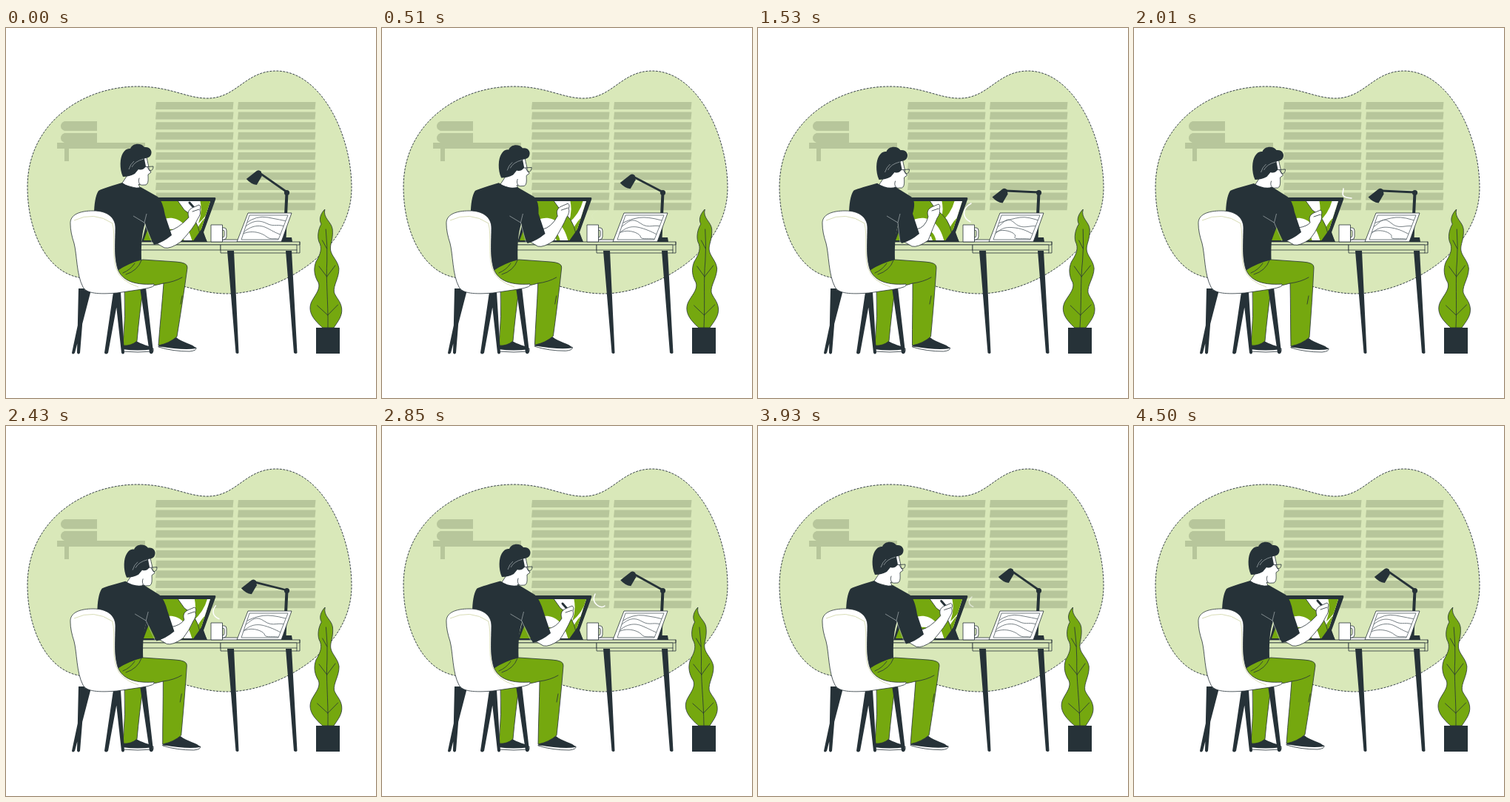
An HTML page for the animation above (4.56 s loop, 500x500 px).

```html
<!DOCTYPE html>
<html lang="en">
<head>
<meta charset="utf-8">
<title>At the desk</title>
<style>
  html, body { margin: 0; width: 100%; height: 100%; overflow: hidden; background: #fff; }
  svg { display: block; width: 100%; height: 100%; }
  .dark { fill: #263238; }
  .green { fill: #75a80f; }
  .shade { fill: #b7c69b; }
  .white { fill: #fff; }
  .wall { fill: #d9e8b9; }
  .edge { stroke: #263238; stroke-width: .8; stroke-linejoin: round; }
  .line { fill: none; stroke: #263238; stroke-width: .8; stroke-linecap: round; }
  .bar { fill: none; stroke: #263238; stroke-linecap: round; }
  .soft { fill: none; stroke: #667075; stroke-width: .9; }
  .pale { fill: none; stroke: #aab2b5; stroke-width: .7; }
</style>
</head>
<body>
<svg viewBox="0 0 500 500">
  <defs>
    <clipPath id="screen"><path d="M206 234H276L259 287H186Z"/></clipPath>
    <clipPath id="sheet"><path d="M329 253H381L368 286H318Z"/></clipPath>
  </defs>

  <path class="wall" stroke="#263238" stroke-width=".9" stroke-dasharray="3 1.500" d="M29 215C29 128 104 79 178 79C222 79 244 95 272 95C312 95 323 58 365 58C425 58 467 143 467 216C467 305 365 359 299 359C254 359 228 339 170 338C140 337 124 342 98 337C52 328 29 270 29 215Z"/>
  <g class="shade">
    <path d="M69 155H188V163H85V180H79V163H69Z"/>
    <path d="M79 126H123V139H79Q74 137 74 132.500Q74 128 79 126Z"/>
    <path d="M79 142H123V155H79Q74 153 74 148.500Q74 144 79 142Z"/>
    <g id="blinds"></g>
  </g>

  <g id="plant">
    <path class="green edge" d="M433 245C428 250 424 258 428 265C424 271 421 284 426 292C429 301 424 309 420 316C416 326 418 336 423 344C426 352 419 360 415 367C408 378 412 388 419 396Q424 402 428 405H443C449 396 455 389 454 379C453 369 446 364 444 357C443 347 451 338 451 325C450 315 441 308 440 300C439 292 444 286 443 272C442 262 430 257 433 245Z"/>
    <path class="line" d="M435 405C436 370 433 340 435 315Q436 295 434 272M435 388L421 375M435 388L449 374M434.500 336L424 322M434.500 336L446 321M435 298L429 287"/>
  </g>
  <path class="dark" d="M419 405H451V440H419Z"/>

  <path class="bar" stroke-width="4" stroke-linecap="butt" d="M379.500 222L376.500 285"/>
  <path class="dark" d="M371 283H386L387 289H370Z"/>
  <path id="lampArm" class="bar" stroke-width="2.800"/>
  <circle class="dark" cx="379.500" cy="222.500" r="3.600"/>
  <g id="lampHead" class="dark">
    <path d="M-3 -2Q0 -4 3 -1L4 5L-3 17Q-11 16 -17 9Z"/>
  </g>

  <path class="white edge" d="M292 286H316L371 287V290H292Z"/>
  <path class="white edge" d="M327 250H386L372 289H312Z"/>
  <path class="soft" d="M329 253H381L368 286H318Z"/>
  <g clip-path="url(#sheet)"><path id="sketch" class="soft"/></g>

  <path class="dark" d="M199 229H282Q284 229 283 232L267 276L272 290H183Z"/>
  <g clip-path="url(#screen)">
    <path class="green" d="M180 230H280V290H180Z"/>
    <path class="white" d="M231 232H278L262 278Q258 256 241 246Z"/>
    <path id="stripe" class="green"/>
    <path class="white" d="M204 263C222 250 245 257 252 290H241C239 271 224 266 198 279Z"/>
    <path class="white" d="M206 290Q219 270 234 282L237 290Z"/>
    <path class="line" d="M231 232L241 246Q258 256 262 278"/>
  </g>
  <path class="dark" d="M264 272L272 289H252Z"/>

  <path class="wall edge" d="M170 289H397V293H170Z"/>
  <path class="wall edge" d="M170 293H290V300H170Z"/>
  <path class="wall edge" d="M290 293H393V304H290Z"/>
  <path class="line" d="M290 300H393M397 289V304H393"/>
  <path class="dark" d="M299 301H308L314.500 439Q313 441 310.500 439ZM378 301H386L393.500 439Q392 441 389 439Z"/>
  <path id="steam" fill="none" stroke="#fff" stroke-width="1.500" stroke-linecap="round"/>
  <path class="white edge" fill-rule="evenodd" d="M292 270H295Q298 270 298 274V282Q298 286 294 286H292ZM292 273V283H293Q295 283 295 280V275Q295 273 293 273Z"/>
  <path class="white edge" d="M277 266H292.500V289H277Z"/>

  <path class="white edge" d="M157 433H199V437Q178 439 157 437Z"/>
  <path class="dark" d="M159 427L175 422C182 428 195 429 199 434Q178 437 157 434Z"/>
  <path class="green edge" d="M160 350L186 346Q180 389 177 423Q169 430 158 429Q162 390 160 350Z"/>
  <g id="shoe">
    <path class="white edge" d="M206 430L257 432Q258 436 248 437Q225 437 206 431Z"/>
    <path class="dark" d="M208 428L230 418C238 425 253 427 257 433Q240 436 206 430Z"/>
  </g>
  <path id="pants" class="green edge"/>
  <path class="line" d="M183 314Q178 328 162 333M174 318Q168 327 158 331"/>
  <path id="crease" class="line"/>

  <path id="pen" class="bar" stroke-width="3"/>
  <path id="forearm" class="white edge"/>
  <path id="fingers" class="line"/>
  <g id="head">
    <path class="white edge" d="M166 196L187 174H190C191 181 193 186 193 190L196 195L192 198C192 204 193 210 189 212Q183 213 179 211L182 218L156 211Z"/>
    <path class="dark" d="M158 201C153 190 154 175 158 169Q162 162 168 163C171 155 183 155 187 161C195 160 199 167 195 173C191 177 187 175 187 177L189 187Q185 193 179 191L174 197Q167 201 158 201Z"/>
    <path class="pale" d="M170 188Q174 180 186 177M166 191Q168 184 173 180"/>
    <path class="line" d="M182 188L199 187Q199 193 194 193L191 188M180 203Q178 208 181 211"/>
  </g>
  <path id="shirt" class="dark"/>
  <path id="folds" class="pale"/>

  <path class="dark" d="M98 352H107L100 439Q98 442 96 439ZM107 354H115L93 439Q90 442 89 439ZM145 357H153L138 439Q135 442 133 439ZM147 357H155L160 439Q158 442 156 439ZM181 351H189L199 438Q197 442 194 439Z"/>
  <path class="white edge" d="M87 265C86 252 100 247 118 247C138 247 148 257 148 270C148 288 146 306 150 322C154 340 171 348 200 346Q203 350 184 353L150 358C125 360 109 359 104 350C95 333 96 306 92 291Q87 276 87 265Z"/>
  <path fill="none" stroke="#cfd3a4" stroke-width=".8" d="M92 260Q119 247 144 264C148 281 143 306 149 325Q154 342 179 350"/>
</svg>
<script>
const $ = id => document.getElementById(id);
const draw = (id, d) => $(id).setAttribute('d', d);
const move = (id, x, y) => $(id).setAttribute('transform', `translate(${x} ${y})`);
const LOOP = 4560, END = 4500, STEP = 30;

// Pose values at each key time; the last pose leads back to the first.
const times = [0, 930, 1530, 2010, 2850, 3420];
const pose = {
  headX: [0, 5.5, 5.5, 5.5, 4, 0],
  headY: [0, 3, 4, 4, 3, 0],
  body: [0, 2, 4, 5, 3, 0],
  cuffX: [224, 218, 218, 226, 228, 224],
  cuffY: [280, 277, 278, 276, 280, 282],
  handX: [254, 237, 237, 245, 250, 253],
  handY: [249, 246, 248, 256, 253, 250],
  pen: [1, 0, 0, 0, 1, 1],
  knee: [0, -4, -4, -2, 0, 0],
  foot: [0, 1, 2.5, 6, 5, 0.5],
  footY: [0, -1, 0, 1, 1, 1],
  lamp: [35, 17, 2.5, 2.5, 29, 35],
  art: [0, -14, -14, -12, -3, 0]
};

// Smooth curve through the keys without overshoot.
function sample(v, t) {
  const n = v.length;
  const at = i => times[(i + n) % n] + END * Math.floor(i / n);
  const val = i => v[(i + n) % n];
  const slope = i => (val(i + 1) - val(i)) / (at(i + 1) - at(i));
  const tangent = i => {
    const a = slope(i - 1), b = slope(i);
    return a * b <= 0 ? 0 : 2 * a * b / (a + b);
  };
  let i = n - 1;
  while (i && times[i] > t) i--;
  const h = at(i + 1) - at(i), u = (t - at(i)) / h, w = 1 - u;
  return val(i) * w * w * (1 + 2 * u) + val(i + 1) * u * u * (3 - 2 * u)
    + h * u * w * (tangent(i) * w - tangent(i + 1) * u);
}

// Wisps: time, then four points of a curve.
const wisps = [
  [500, 287, 260, 279, 254, 286, 249, 292, 246],
  [930, 285, 249, 295, 246, 313, 243, 300, 237],
  [1380, 287, 263, 281, 258, 278, 255, 278, 250],
  [1530, 287, 262, 277, 257, 274, 245, 288, 237],
  [2010, 294, 230, 277, 229, 283, 223, 283, 217],
  [2400, 287, 262, 277, 257, 278, 250, 283, 244],
  [2850, 301, 243, 297, 248, 281, 240, 288, 227],
  [3420, 287, 260, 282, 256, 281, 248, 292, 246],
  [4100, 292, 239, 283, 236, 286, 230, 288, 226]
];

function steam(t) {
  const el = $('steam');
  const i = wisps.findIndex((w, k) => k + 1 < wisps.length && t >= w[0] && t < wisps[k + 1][0]);
  if (i < 0) { el.style.opacity = 0; return; }
  const a = wisps[i], b = wisps[i + 1], u = (t - a[0]) / (b[0] - a[0]);
  const p = a.map((x, k) => x + (b[k] - x) * u);
  draw('steam', `M${p[1]} ${p[2]}C${p.slice(3).join(' ')}`);
  el.style.opacity = Math.min(1, (t - 500) / 200, (4100 - t) / 300);
}

function arm(s) {
  const S = (x, y) => `${s.cuffX + x} ${s.cuffY + y} `;
  const H = (x, y) => `${s.handX + x} ${s.handY + y} `;
  draw('forearm', `M${S(-4, -6)}Q${S(8, -8)}${H(-7, 7)}C${H(-10, -2)}${H(-5, -5)}${H(0, -7)}`
    + `L${H(7, -10)}Q${H(10, -8)}${H(8, -3)}Q${H(10, 2)}${H(5, 9)}`
    + `Q${H(0, 21)}${S(12, 9)}Q${S(-2, 19)}${S(-10, 17)}L${S(-22, 10)}Z`);
  draw('fingers', `M${H(-2, -1)}L${H(7, -4)}`);
  draw('pen', `M${H(-6, -13)}L${H(1, -5)}`);
  $('pen').style.opacity = s.pen > 0.5 ? 1 : 0;

  const b = s.body;
  draw('shirt', `M${119 + b} 252C${119 + b} 238 ${121 + b} 226 ${125 + b} 220`
    + `Q${127 + b} 218 ${157 + b} ${209 + b * 0.2}Q${170 + b} 218 ${182 + b} 215L${205 + b / 2} 228`
    + `Q${212 + b / 2} 234 ${S(-9, -27)}L${S(0, 0)}Q${S(-12, 10)}${S(-24, 13)}`
    + `Q${S(-30, 1)}${188 + b / 2} 264Q${182 + b / 2} 280 ${183 + b / 2} 313`
    + `Q166 318 150 328L140 290Z`);
  draw('folds', `M${172 + b / 2} 254L${187 + b / 2} 263L${S(-26, 12)}M${187 + b / 2} 263L${190 + b / 2} 251`);
}

function legs(s) {
  const k = s.knee, f = s.foot, y = s.footY;
  const shin = (x, u) => x + k * (1 - u) + f * u;
  draw('pants', `M149 329Q166 315 185 313L${230 + k} 316Q${246 + k} 317 ${245 + k} 324`
    + `C${shin(241, 0.33)} 354 ${shin(236, 0.67)} 386 ${231 + f} ${417 + y}`
    + `Q${221 + f} ${426 + y} ${206 + f} ${429 + y}`
    + `C${shin(208, 0.67)} 400 ${shin(211, 0.33)} 373 ${213 + k} 345Q198 349 170 352Q151 345 149 329Z`);
  draw('crease', `M${213 + k} 345Q${228 + k} 343 ${238 + k} 337M${238 + k} 362L${236 + k} 373`);
  move('shoe', f, y);
}

function lamp(deg) {
  const a = deg * Math.PI / 180;
  const x = 380 - 46 * Math.cos(a), y = 222 - 46 * Math.sin(a);
  draw('lampArm', `M380 222L${x} ${y}`);
  move('lampHead', x - 0.5, y - 0.5);
}

function art(dx) {
  draw('stripe', `M${262 + dx} 232H${280 + dx}Q${276 + dx} 250 ${260 + dx} 264Q${266 + dx} 248 ${262 + dx} 232Z`
    + 'M274 252Q258 264 252 290H266Z');
  const q = dx / 3;
  draw('sketch', `M322 270C${330 - q} 262 ${340 + q} ${258 + q} ${352 + q} 264S${366 - q} 263 382 270`
    + `M316 282C${325 - q} 269 ${340 + q} ${264 - q} ${352 + q} 270S${362 - q} 276 376 281`
    + `M318 279C${332 + q} ${272 + q} ${346 - q} 277 ${352 + q} 282S362 283 372 286`
    + `M324 264Q${338 - q} ${253 - q} 354 256T384 262`);
}

function render(ms) {
  const t = Math.min(END, Math.floor(ms % LOOP / STEP) * STEP) % END;
  const s = {};
  for (const k in pose) s[k] = sample(pose[k], t);
  move('head', s.headX, s.headY);
  arm(s);
  legs(s);
  lamp(s.lamp);
  art(s.art);
  steam(t);
  const sway = 8 * Math.cos(2 * Math.PI * (t - 1230) / END) - 1;
  const k = -sway / 160;
  $('plant').setAttribute('transform', `matrix(1 0 ${k} 1 ${-405 * k} 0)`);
}

let rows = '';
for (let i = 0; i < 11; i++) {
  const y = 100 + i * 13.62;
  for (const x of [202, 313]) rows += `<path d="M${x + 1} ${y}H${x + 105.5}L${x + 104.5} ${y + 10}H${x}Z"/>`;
}
$('blinds').innerHTML = rows;

const start = performance.now();
function tick() {
  render(performance.now() - start);
  requestAnimationFrame(tick);
}
tick();
</script>
</body>
</html>
```
